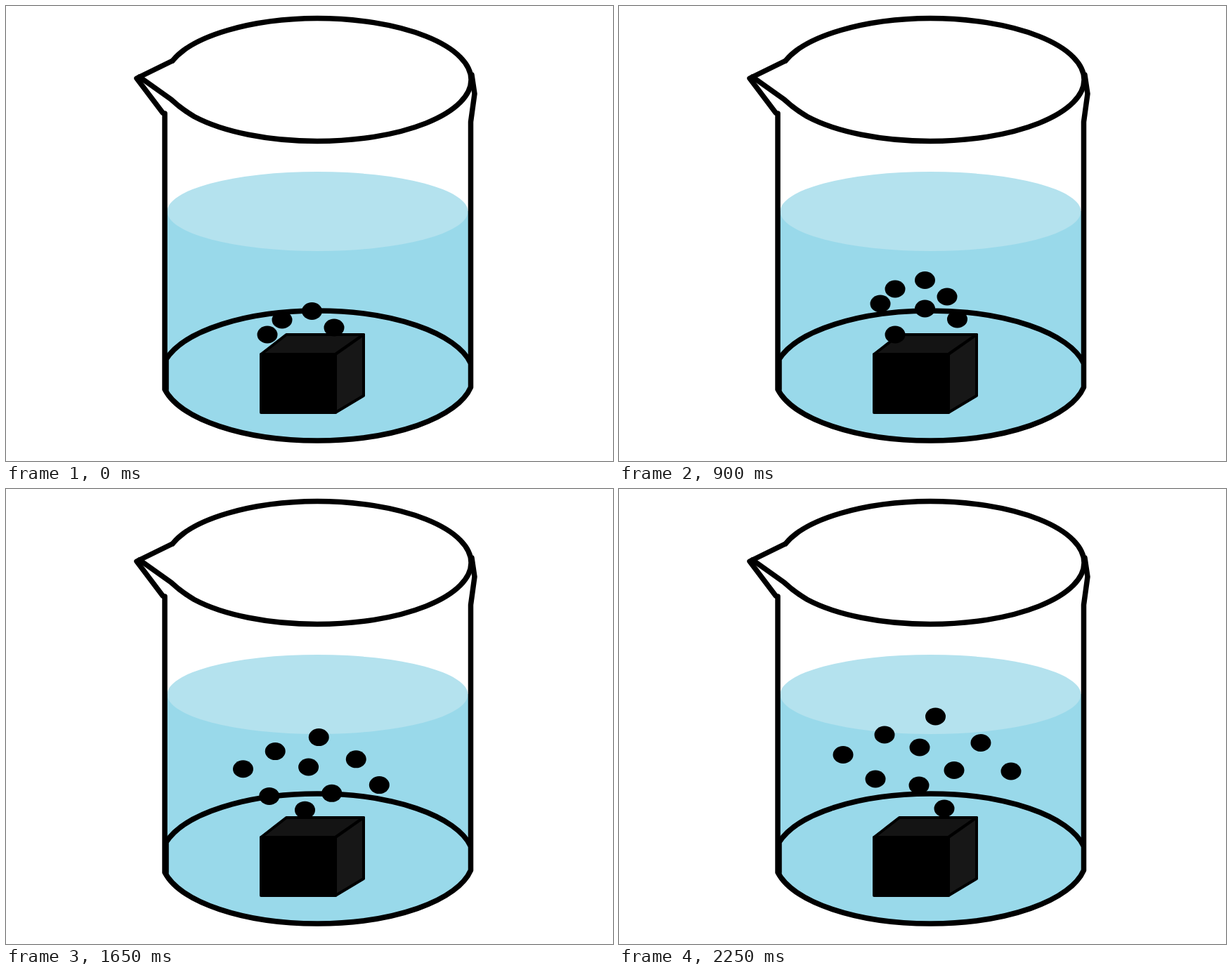
Write an HTML page that moves like this. It is 864 by 648 pixels and loops after 2400 ms.

```html
<!DOCTYPE html>
<html lang="en">
<head>
<meta charset="utf-8">
<title>Dissolving cube</title>
<style>
  html, body { margin: 0; width: 100%; height: 100%; overflow: hidden; background: #fff; }
  svg { display: block; width: 864px; height: 648px; }
  .glass { fill: none; stroke: #000; stroke-width: 7.5; stroke-linejoin: round; stroke-linecap: round; }
  .cube { stroke: #000; stroke-width: 4; stroke-linejoin: round; }
</style>
</head>
<body>
<svg viewBox="0 0 864 648">
  <!-- water -->
  <path fill="#99d9ea" d="M228 292V546A222 92.5 0 0 0 444 619A222 92.5 0 0 0 660 546V292Z"/>
  <ellipse fill="#b4e2ee" cx="443.5" cy="292.5" rx="214" ry="56.5"/>

  <!-- beaker -->
  <g class="glass">
    <path d="M237 78A219 87.5 0 0 1 443 17.5A219 87.5 0 0 1 662 105A219 87.5 0 0 1 443 192.5A219 87.5 0 0 1 268 157.5Q250 147 235 133L190 101"/>
    <path d="M237 78L186 103L223 152"/>
    <path d="M226 153V546A222 92.5 0 0 0 444 619A222 92.5 0 0 0 661.5 543V165L667 125L663 98"/>
    <path d="M228 546V503A222 92.5 0 0 1 444 434A222 92.5 0 0 1 661 508"/>
  </g>

  <!-- cube -->
  <g class="cube">
    <path fill="#141414" d="M363 496L399 468H509L469 496Z"/>
    <path fill="#171717" d="M469 496L509 468V555L469 579Z"/>
    <path fill="#000" d="M363 496H469V579H363Z"/>
  </g>

  <g id="dots"></g>
</svg>
<script>
const LOOP = 2400, STEP = 150, LAST = LOOP / STEP - 1;
const SPREAD = 6; // the step at which the dots stop rising straight and drift apart

// Where each dot leaves the cube, and where it is on the last step.
const dots = [
  { born: 0, from: [372, 468], to: [319, 378.5] },
  { born: 0, from: [393, 447], to: [378, 350] },
  { born: 0, from: [435.5, 434.5], to: [450.5, 324] },
  { born: 0, from: [467, 458], to: [515, 361.5] },
  { born: 3, from: [435.5, 455.5], to: [428, 368] },
  { born: 5, from: [393, 477], to: [365, 413] },
  { born: 5, from: [481.5, 455], to: [558, 402] },
  { born: 8, from: [449.5, 458], to: [477, 400.5] },
  { born: 10, from: [425, 466], to: [427, 422] },
  { born: 13, from: [463, 470], to: [463, 455] }
];

const layer = document.getElementById("dots");

for (const dot of dots) {
  dot.el = document.createElementNS(layer.namespaceURI, "ellipse");
  dot.el.setAttribute("rx", 14.5);
  dot.el.setAttribute("ry", 12.5);
  layer.append(dot.el);
}

const mix = (a, b, f) => a + (b - a) * f;
const easeOut = f => 1 - (1 - f) ** 1.3;

// Height of the shared straight rise, a little faster after step 4.
function rise(step) {
  const s = Math.min(step, SPREAD);
  return 6.5 * s + 2.5 * Math.max(0, s - 4);
}

function place({ born, from, to }, step) {
  const release = Math.max(born, SPREAD);
  const f = Math.max(0, (step - release) / (LAST - release));
  const y = from[1] - (rise(step) - rise(born));
  return [mix(from[0], to[0], easeOut(f)), mix(y, to[1], f)];
}

function draw(step) {
  for (const dot of dots) {
    const shown = step >= dot.born;
    dot.el.setAttribute("visibility", shown ? "visible" : "hidden");
    if (!shown) continue;
    const [x, y] = place(dot, step);
    dot.el.setAttribute("cx", x);
    dot.el.setAttribute("cy", y);
  }
}

const start = performance.now();

function tick(now) {
  const t = Math.max(0, now - start) % LOOP;
  draw(Math.floor(t / STEP));
  requestAnimationFrame(tick);
}

draw(0);
requestAnimationFrame(tick);
</script>
</body>
</html>
```
